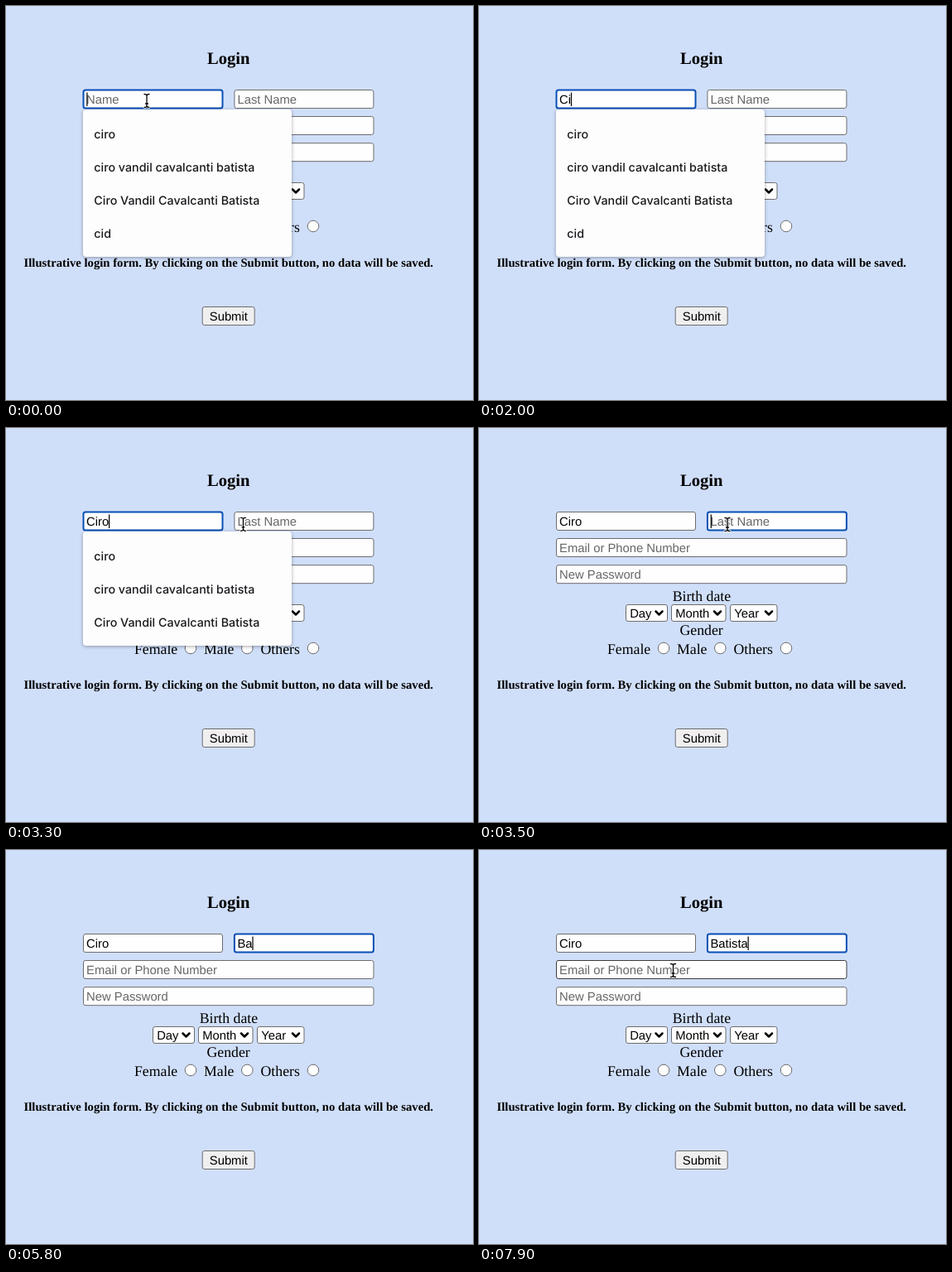
Recreate the animation shown at these times as an HTML page. Size 564x476 px, loop 8000 ms.

```html
<!DOCTYPE html>
<html lang="en">
<head>
<meta charset="utf-8">
<title>Login form</title>
<style>
  html, body { margin: 0; width: 100%; height: 100%; overflow: hidden; background: #d0dff9; }
  svg { display: block; width: 100%; height: 100%; text-rendering: geometricPrecision; }
  text { white-space: pre; }
  .serif { font: 17.76px "Liberation Serif", serif; }
  .title { font: bold 20.6px "Liberation Serif", serif; }
  .note { font: bold 14.7px "Liberation Serif", serif; }
  .sans { font: 14.8px "Liberation Sans", sans-serif; }
  .item { font: 550 14.3px Inter, sans-serif; fill: #18191c; }
  .hint { fill: #666; }
  .box { fill: #fefefe; stroke: #6c6c6e; }
  .box.hover { stroke: #3c3c3c; }
  .box.focus { stroke: #084fb4; stroke-width: 2; }
  .popup { fill: #fdfdfe; filter: drop-shadow(0 1px 2px #0005); }
  .line { fill: none; stroke: #000; stroke-linecap: round; stroke-linejoin: round; }
</style>
</head>
<body>
<svg id="stage" viewBox="0 0 564 476"></svg>
<script>
const stage = document.getElementById("stage");

function add(tag, attrs, text = "", parent = stage) {
  const node = document.createElementNS("http://www.w3.org/2000/svg", tag);
  for (const key in attrs) node.setAttribute(key, attrs[key]);
  node.textContent = text;
  return parent.appendChild(node);
}
const label = (cls, x, y, text, parent) => add("text", { class: cls, x, y }, text, parent);
const box = (x, y, width, height, extra = {}) =>
  add("rect", { class: "box", x, y, width, height, rx: 2.5, ...extra });
const show = (node, on) => node.setAttribute("visibility", on ? "visible" : "hidden");

function field(x, y, width, hint) {
  return { x, frame: box(x, y, width, 22), text: label("sans hint", x + 3.6, y + 16.4, hint), hint };
}
function fill(input, value) {
  input.text.textContent = value || input.hint;
  input.text.setAttribute("class", value ? "sans" : "sans hint");
}

label("title", 243, 70, "Login");
const first = field(93.5, 101.5, 168, "Name");
const last = field(275.9, 101.5, 168, "Last Name");
const email = field(93.5, 133.5, 350.5, "Email or Phone Number");
field(93.5, 165.7, 350.5, "New Password");

label("serif", 233.7, 209, "Birth date");
for (const [x, width, text] of [[177.5, 50, "Day"], [232.5, 65.5, "Month"], [303.5, 56.5, "Year"]]) {
  box(x, 213.5, width, 20);
  label("sans", x + 4.7, 229, text);
  add("path", { class: "line", "stroke-width": 2.5, d: `M${x + width - 14} 221.5l4 4 4-4` });
}
label("serif", 242.5, 250, "Gender");
for (const [x, text, dot] of [[155, "Female", 223], [239, "Male", 291.3], [307.5, "Others", 371]]) {
  label("serif", x, 273, text);
  add("circle", { class: "box", cx: dot, cy: 266, r: 6.8 });
}
label("note", 21.5, 315, "Illustrative login form. By clicking on the Submit button, no data will be saved.");
box(237.2, 363.5, 63, 22, { style: "fill:#efefef" });
label("sans", 245.8, 379.8, "Submit");

function popup(x, width, items) {
  const group = add("g", {});
  const panel = add("rect", { class: "popup", x, y: 125, width, rx: 4 }, "", group);
  const rows = items.map((text, i) => label("item", x + 13.3, 159.8 + 40 * i, text, group));
  return count => {
    show(group, count > 0);
    panel.setAttribute("height", 18 + 40 * count);
    rows.forEach((row, i) => row.setAttribute("display", i < count ? "inline" : "none"));
  };
}
const firstList = popup(93, 252,
  ["ciro", "ciro vandil cavalcanti batista", "Ciro Vandil Cavalcanti Batista", "cid"]);
const lastList = popup(275.5, 212.5, ["torres"]);

const caret = add("rect", { y: 104.5, width: 1.2, height: 16.5 });
const beam = add("g", {});
const beamPath = "M-3-8Q0-8 0-6Q0-8 3-8M0-6V6M-3 8Q0 8 0 6Q0 8 3 8M-1.5 3.5H1.5";
for (const [stroke, width] of [["#fff", 2.8], ["#000", 1.3]])
  add("path", { class: "line", d: beamPath, style: `stroke:${stroke};stroke-width:${width}` }, "", beam);

const FIRST = "Ciro", firstKeys = [1200, 2000, 2300, 2900];
const LAST = "Batista", lastKeys = [5500, 5800, 6000, 6100, 6200, 6400, 6600];
const FOCUS_LAST = 3500, HOVER_EMAIL = 6900;

const typed = (text, keys, t) => text.slice(0, keys.filter(k => k <= t).length);

function glide(t, start, end, from, to) {
  const p = Math.min(1, Math.max(0, (t - start) / (end - start)));
  const eased = p * p * (3 - 2 * p);
  return from.map((v, i) => v + (to[i] - v) * eased);
}

function pointer(t) {
  if (t < 1200) return [170, 114.5];
  if (t >= 3000 && t < 5500) return glide(t, 2900, 3400, [170, 114.5], [300, 116.5]);
  if (t >= HOVER_EMAIL) return glide(t, 6900, 7300, [268.5, 147.5], [234.5, 145.5]);
}

function render(now) {
  const t = Math.floor(now % 8000 / 100) * 100;
  const onLast = t >= FOCUS_LAST;
  const active = onLast ? last : first;
  const name = typed(FIRST, firstKeys, t);
  const surname = typed(LAST, lastKeys, t);
  fill(first, name);
  fill(last, surname);
  first.frame.setAttribute("class", onLast ? "box" : "box focus");
  last.frame.setAttribute("class", onLast ? "box focus" : "box");
  email.frame.setAttribute("class", t >= HOVER_EMAIL ? "box hover" : "box");

  firstList(onLast ? 0 : t < 2300 ? 4 : 3);
  lastList(t >= 3600 && t < 5500 ? 1 : 0);

  // The caret restarts its blink on each key press or focus change.
  const since = Math.max(...[0, FOCUS_LAST, ...firstKeys, ...lastKeys].filter(k => k <= t));
  const value = onLast ? surname : name;
  caret.setAttribute("x", active.x + 3.8 + (value ? active.text.getComputedTextLength() - 0.4 : 0));
  show(caret, (t - since) % 1000 < (since === firstKeys[0] ? 600 : 500));

  const at = pointer(t);
  show(beam, at);
  if (at) beam.setAttribute("transform", `translate(${at})`);
  requestAnimationFrame(() => render(performance.now()));
}
render(performance.now());
</script>
</body>
</html>
```
